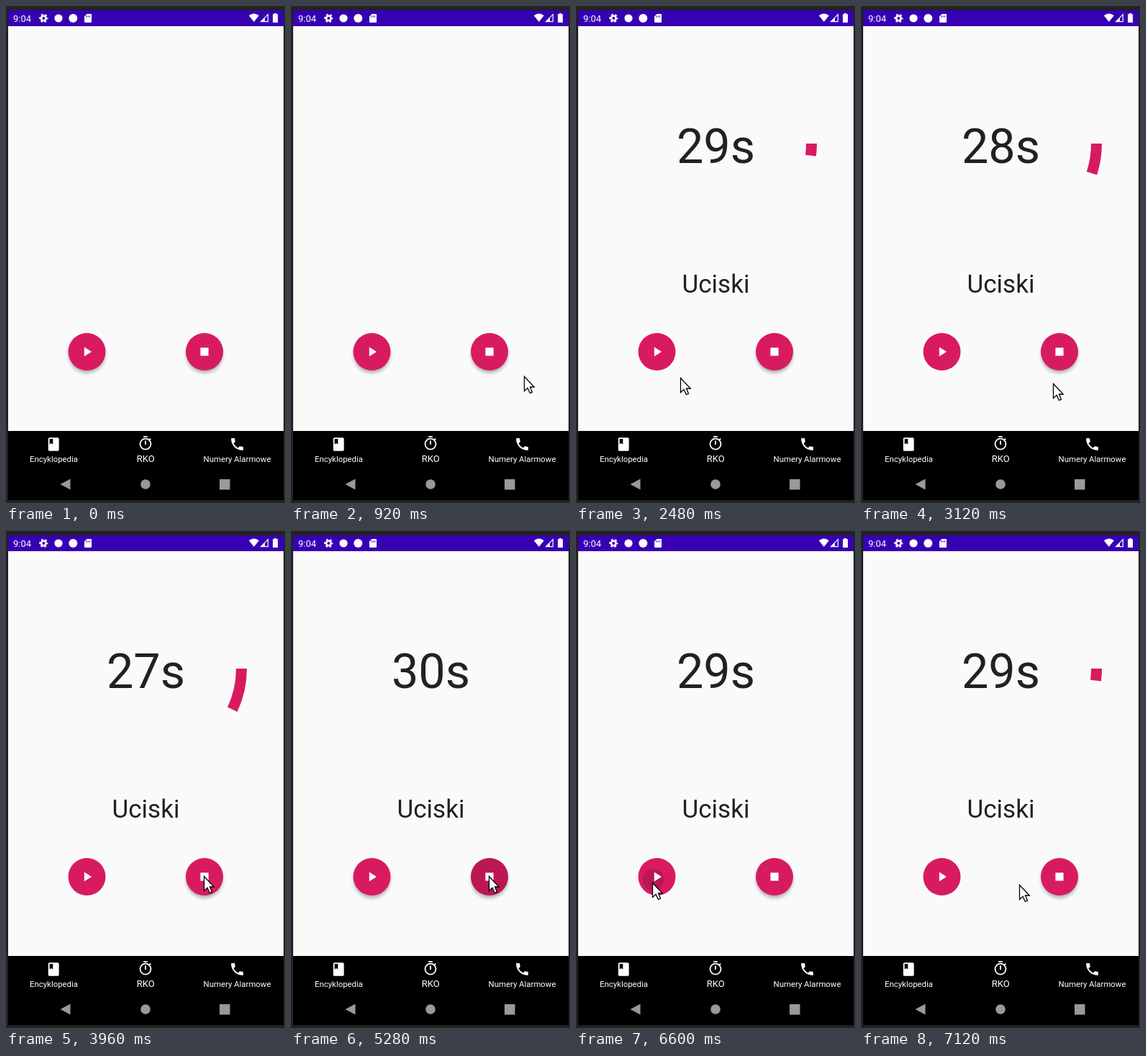
An HTML page that plays this animation: 388 px wide and 690 px high, repeating every 7160 ms.

```html
<!DOCTYPE html>
<html lang="pl">
<head>
<meta charset="utf-8">
<title>RKO</title>
<style>
  html, body { margin: 0; width: 100%; height: 100%; overflow: hidden; background: #222; }
  svg { display: block; width: 388px; height: 690px; }
  text { font-family: Roboto, sans-serif; }
  .middle { text-anchor: middle; }
  .shadow { filter: blur(2.6px); opacity: .3; }
</style>
</head>
<body>
<svg viewBox="0 0 388 690">
  <defs>
    <clipPath id="disc"><circle r="26"/></clipPath>
    <clipPath id="screen"><rect x="3" y="6" width="383" height="680"/></clipPath>
  </defs>

  <rect width="388" height="690" fill="#222"/>
  <rect x="3" y="6" width="383" height="22" fill="#3700b3"/>
  <rect x="3" y="28" width="383" height="562" fill="#fafafa"/>
  <rect x="3" y="590" width="383" height="96" fill="#000"/>

  <!-- status bar -->
  <g fill="#fff">
    <text x="10" y="21.7" font-size="13">9:04</text>
    <g transform="translate(52.3 17)" fill="none" stroke="#fff">
      <circle r="3.3" stroke-width="2.6"/>
      <circle r="5.2" stroke-width="2" stroke-dasharray="2.7 2.745" stroke-dashoffset="1.35"/>
    </g>
    <circle cx="73" cy="17" r="5.6"/>
    <circle cx="93.3" cy="17" r="6"/>
    <path d="M112.6 11H118q1 0 1 1V22q0 1-1 1H110q-1 0-1-1V14.6Z"/>
    <path d="M111.8 13.4v2.4M114.2 13.4v2.4M116.6 13.4v2.4" stroke="#3700b3"/>
    <path d="M337.8 13.2Q344.8 8 351.8 13.2L344.8 22Z"/>
    <path d="M364.3 11.6V21.6H354.5Z" fill="none" stroke="#fff" stroke-width="1.2"/>
    <path d="M360 16V22H354Z"/>
    <path d="M373 10h3v1.3h2V23H371V11.3h2Z"/>
  </g>

  <!-- timer -->
  <circle id="arc" cx="194" cy="191" r="133.5" fill="none" stroke="#d81b60" stroke-width="15" pathLength="100"/>
  <g id="labels" class="middle" fill="#212121">
    <text id="seconds" x="194.5" y="218" font-size="66.5"></text>
    <text x="194.5" y="398" font-size="35">Uciski</text>
  </g>

  <g transform="translate(112.5 480)">
    <circle id="playShadow" class="shadow" cy="4" r="25.5"/>
    <circle r="26" fill="#d81b60"/>
    <g clip-path="url(#disc)"><circle id="playRipple" cx="-5" cy="4"/></g>
    <path d="M-3.7-6.5V6.5L6.5 0Z" fill="#fff"/>
  </g>
  <g transform="translate(276 480)">
    <circle class="shadow" cy="4" r="25.5"/>
    <circle r="26" fill="#d81b60"/>
    <g clip-path="url(#disc)"><circle id="stopRipple"/></g>
    <rect x="-5.6" y="-5.6" width="11.2" height="11.2" fill="#fff"/>
  </g>

  <!-- bottom navigation -->
  <g fill="#fff">
    <path transform="translate(55 597.3) scale(.932)" fill-rule="evenodd"
      d="M18 2H6Q4 2 4 4V20Q4 22 6 22H18Q20 22 20 20V4Q20 2 18 2ZM6 4H11V12L8.5 10.5 6 12Z"/>
    <path transform="translate(182.8 596) scale(.932)" fill="none" stroke="#fff" stroke-width="2"
      d="M9 2H15M12 8V14M18 6.6L19.8 4.9M4 13A8 8 0 0 1 20 13A8 8 0 0 1 4 13Z"/>
    <path transform="translate(310.3 597.3) scale(.932)"
      d="M6.6 10.8C8 13.6 10.4 15.9 13.2 17.4L15.4 15.2Q15.9 14.7 16.4 14.9Q18 15.5 20 15.5Q21 15.5 21 16.5V20Q21 21 20 21C10.6 21 3 13.4 3 4Q3 3 4 3H7.5Q8.5 3 8.5 4Q8.5 6 9.1 7.6Q9.3 8.1 8.8 8.6Z"/>
    <g class="middle">
      <text x="66.5" y="632.8" font-size="11.4">Encyklopedia</text>
      <text x="194.3" y="632.8" font-size="13">RKO</text>
      <text x="321.5" y="632.8" font-size="11.4">Numery Alarmowe</text>
    </g>
  </g>
  <g fill="#999">
    <path d="M75.5 664L89.5 656.5V671.5Z"/>
    <circle cx="194" cy="664" r="6.8"/>
    <rect x="297" y="657" width="14.5" height="14.5"/>
  </g>

  <g clip-path="url(#screen)">
    <path id="cursor" d="M.5.5V20.5L5 16.3 8.3 23.5 11.5 22.2 8.5 15H14.2Z" fill="#fff" stroke="#000" stroke-width="1.3"/>
  </g>
</svg>

<script>
const LOOP = 7160;
const STEP = 300;                       // one percent of the 30 s ring
const RUNS = [[1590, 4880], [6400, LOOP]];
const PLAY_PRESSES = [1540, 6340];
const STOP_PRESSES = [4800];
const CURSOR_IN = 480;

// time, x, y of the pointer tip
const PATH = [
  [480, 388, 600], [1000, 320, 508], [1420, 106, 488], [2280, 106, 488],
  [2750, 205, 560], [3120, 267, 524], [3640, 275, 479], [5380, 275, 479],
  [5880, 100, 495], [6040, 100, 495], [6220, 106, 488], [6780, 106, 488],
  [7120, 220, 491], [7160, 228, 491]
];

const $ = id => document.getElementById(id);
const clamp = v => Math.min(1, Math.max(0, v));
const ease = p => p * p * (3 - 2 * p);

function pointerAt(t) {
  const i = Math.max(1, PATH.findIndex(p => p[0] > t));
  const [t0, x0, y0] = PATH[i - 1], [t1, x1, y1] = PATH[i];
  const p = ease(clamp((t - t0) / (t1 - t0)));
  return [x0 + (x1 - x0) * p, y0 + (y1 - y0) * p];
}

function drawRipple(circle, presses, t) {
  const age = t - (presses.findLast(p => p <= t) ?? -LOOP);
  circle.setAttribute('r', Math.min(34, age * 0.057));
  circle.setAttribute('opacity', 0.135 * clamp((700 - age) / 190));
}

function draw(t) {
  const run = RUNS.find(([from, to]) => t >= from && t < to);
  const elapsed = run ? t - run[0] : 0;
  const percent = Math.floor(elapsed / STEP);

  $('labels').style.display = t < RUNS[0][0] ? 'none' : '';
  $('seconds').textContent = (run ? 29 - Math.floor(elapsed / 1000) : 30) + 's';
  $('arc').style.display = percent ? '' : 'none';
  $('arc').setAttribute('stroke-dasharray', percent + ' 100');
  $('playShadow').style.display = run ? 'none' : '';

  drawRipple($('playRipple'), PLAY_PRESSES, t);
  drawRipple($('stopRipple'), STOP_PRESSES, t);

  const [x, y] = pointerAt(t).map(Math.round);
  $('cursor').setAttribute('transform', `translate(${x} ${y})`);
  $('cursor').style.display = t < CURSOR_IN ? 'none' : '';
}

const start = performance.now();
function frame() {
  draw((performance.now() - start) % LOOP);
  requestAnimationFrame(frame);
}
frame();
</script>
</body>
</html>
```
